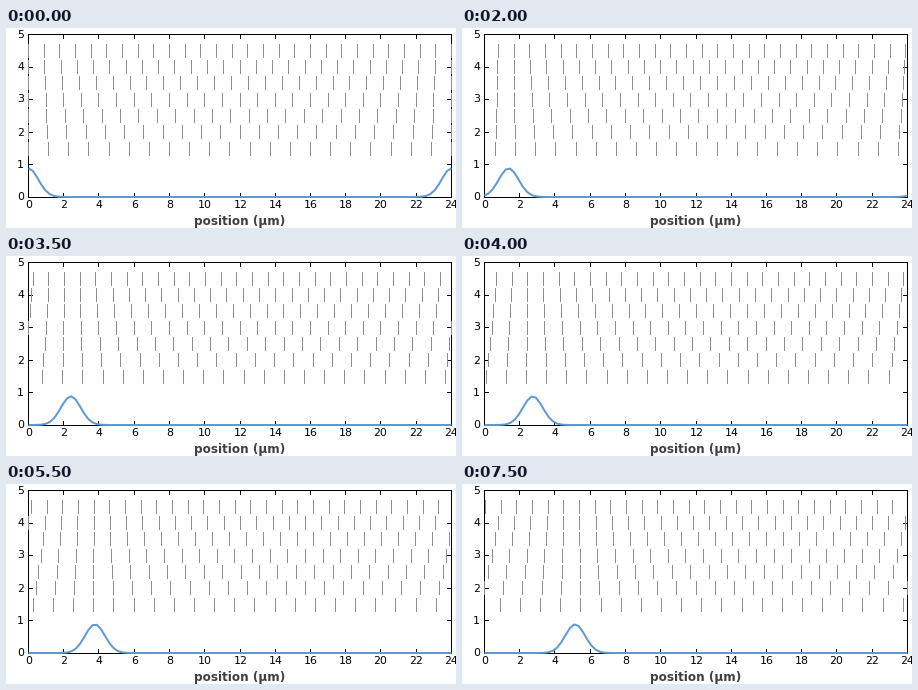
Recreate the animation shown at these times as a matplotlib script. Size 450 by 200 pixels, loop 8000 ms.

```python
import numpy as np
import matplotlib.pyplot as plt
from matplotlib.animation import FuncAnimation
from matplotlib.collections import LineCollection

W, H, DPI = 450, 200, 100
PX = 72 / DPI                       # one pixel in points
LEFT, RIGHT, TOP, BOTTOM = 22, 445, 6, 169
LENGTH = 24                         # ring length in micrometres
FRAMES, INTERVAL = 16, 500
STEPS = 70                          # frames per round trip of the pulse
SLIP = 6                            # crests gained on the pulse per round trip
MODES = range(21, 28)               # crests per round trip, bottom row first

plt.rcParams["font.family"] = "DejaVu Sans"


def to_x(v):
    return LEFT + np.asarray(v) * (RIGHT - LEFT) / LENGTH


def to_y(v):
    return BOTTOM - np.asarray(v) * (BOTTOM - TOP) / 5


fig = plt.figure(figsize=(W / DPI, H / DPI), dpi=DPI, facecolor="white")
ax = fig.add_axes([0, 0, 1, 1])
ax.set_xlim(-0.5, W - 0.5)
ax.set_ylim(H - 0.5, -0.5)
ax.axis("off")


def line_set(segments, color, z):
    lines = LineCollection(segments, colors=color, linewidths=PX,
                           capstyle="projecting", zorder=z)
    lines.set_snap(False)
    ax.add_collection(lines, autolim=False)
    return lines


def draw_frame():
    segs = [[(LEFT, y), (RIGHT, y)] for y in (TOP, BOTTOM)]
    segs += [[(x, TOP), (x, BOTTOM)] for x in (LEFT, RIGHT)]
    for v in range(0, LENGTH + 1, 2):
        x = round(float(to_x(v)))
        segs += [[(x, TOP), (x, TOP + 4)], [(x, BOTTOM), (x, BOTTOM - 4)]]
        ax.text(x, 177, str(v), size=11 * PX, ha="center", va="center")
    for v in range(6):
        y = round(float(to_y(v)))
        segs += [[(LEFT, y), (LEFT + 4, y)], [(RIGHT, y), (RIGHT - 4, y)]]
        ax.text(17.5, y, str(v), size=11 * PX, ha="right", va="center")
    line_set(segs, "black", 1)
    ax.text(233, 196, "position (\u00b5m)", size=12 * PX, weight="bold",
            color="#404040", ha="center", va="baseline")


def crest_segments(step):
    pulse = LENGTH * step / STEPS
    phase = SLIP * step / STEPS
    segs = []
    for row, n in enumerate(MODES):
        mid = 1.5 + 0.5 * row
        top, bottom = np.round(to_y([mid + 0.2, mid - 0.2]))
        xs = pulse + (np.arange(-n - 2, n + 3) + phase) * LENGTH / n
        xs = xs[(xs > -1e-9) & (xs < LENGTH + 1e-9)]
        segs += [[(x, top), (x, bottom)] for x in np.round(to_x(xs))]
    return segs


def envelope(step):
    d = (grid - LENGTH * step / STEPS + LENGTH / 2) % LENGTH - LENGTH / 2
    return 0.88 * np.exp(-d ** 2 / 0.63)


draw_frame()
grid = np.linspace(0, LENGTH, 100)
crests = line_set([], "#8e8e8e", 2)
curve, = ax.plot(to_x(grid), to_y(0 * grid), color="#5e9ad2", lw=2 * PX,
                 solid_capstyle="butt", solid_joinstyle="round", zorder=3)


def update(step):
    crests.set_segments(crest_segments(step))
    curve.set_ydata(to_y(envelope(step)) - 0.5)
    return crests, curve


anim = FuncAnimation(fig, update, frames=FRAMES, interval=INTERVAL,
                     repeat=True, repeat_delay=0)
plt.show()
```
